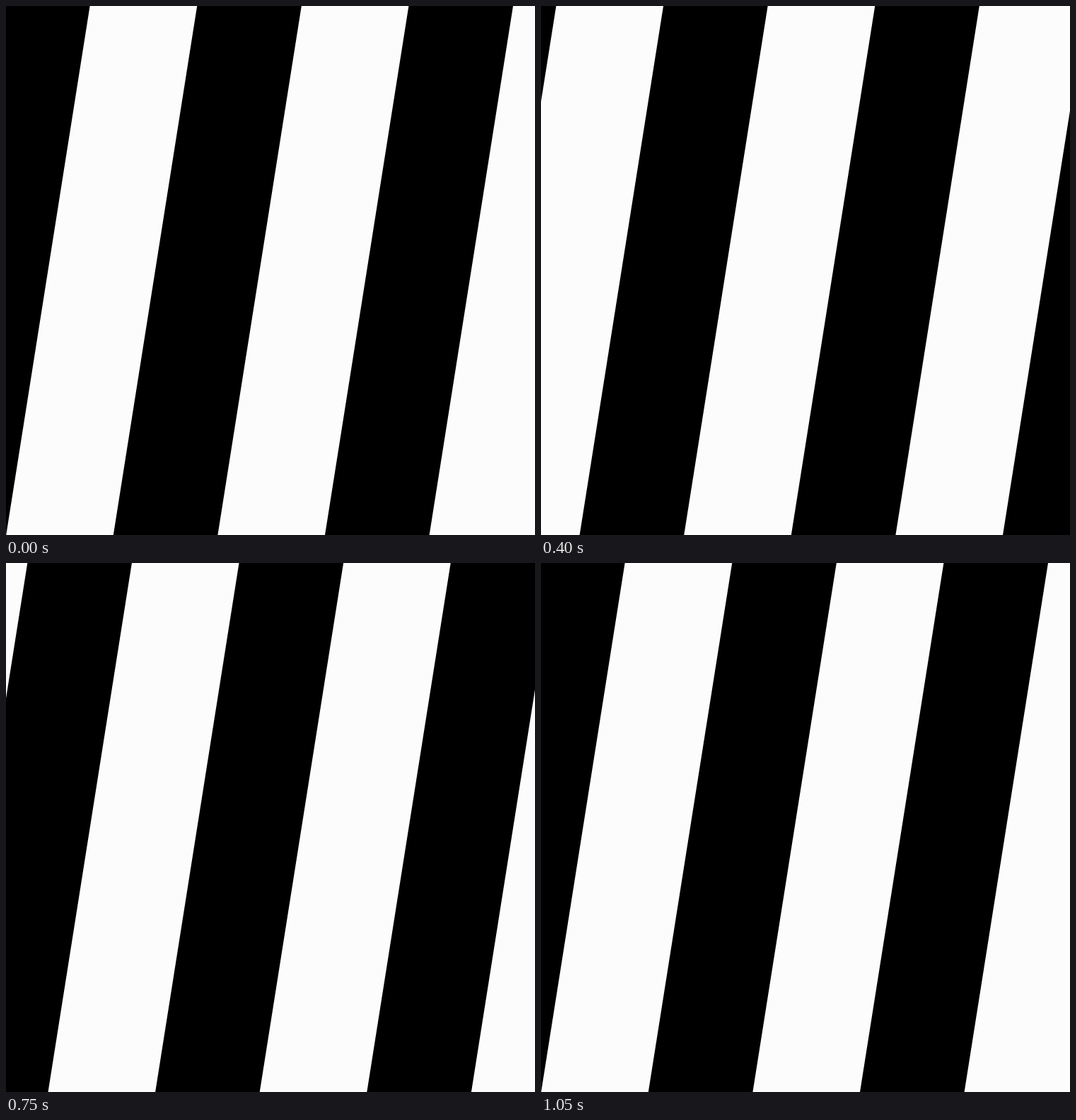
These frames come from a looping animation (748 by 748 pixels, 1100 ms). An HTML page:

```html
<!DOCTYPE html>
<html lang="en">
<head>
<meta charset="utf-8">
<title>Sliding stripes</title>
<style>
  @property --step {
    syntax: "<number>";
    inherits: true;
    initial-value: 0;
  }

  html, body {
    margin: 0;
    width: 100%;
    height: 100%;
    overflow: hidden;
    background: #fcfcfc;
  }

  svg {
    display: block;
    width: 100%;
    height: 100%;
  }

  /* 22 held poses of 50 ms; the last one equals the first. */
  .stripes {
    --u: calc(var(--step) / 21);
    /* smoothstep over one stripe period */
    transform: translateX(calc(-299.2px * var(--u) * var(--u) * (3 - 2 * var(--u))));
    animation: slide 1100ms steps(22, end) infinite;
  }

  @keyframes slide {
    from { --step: 0; }
    to { --step: 22; }
  }
</style>
</head>
<body>
<svg viewBox="0 0 748 748">
  <g class="stripes">
    <path id="stripe" d="M270.2 0h147.6l-118.4 748h-147.6z"/>
    <use href="#stripe" x="-299.2"/>
    <use href="#stripe" x="299.2"/>
    <use href="#stripe" x="598.4"/>
  </g>
</svg>
</body>
</html>
```
